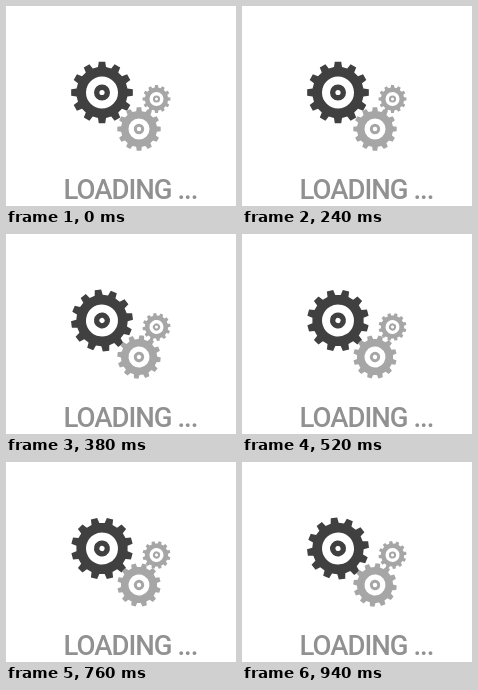
Recreate the animation shown at these times as an HTML page. Size 230x200 px, loop 960 ms.

```html
<!DOCTYPE html>
<html lang="en">
<head>
<meta charset="utf-8">
<title>Loading</title>
<style>
  html, body { margin: 0; width: 100%; height: 100%; overflow: hidden; background: #fff; }
  svg { display: block; width: 230px; height: 200px; }
  text { font: 500 27.5px Roboto, sans-serif; font-stretch: 75%; fill: #919191; }
</style>
</head>
<body>
<svg viewBox="0 0 230 200">
  <g id="gears"></g>
  <text x="57.5" y="193" letter-spacing="-1">LOADING ...</text>
</svg>
<script>
const LOOP = 960, STEP = 20, TEETH = 12, PITCH = 360 / TEETH;
const gears = [
  { x: 96, y: 86.5, r: 31, ring: 16, hub: 8, hole: 2.6, color: '#404040', dir: 1, phase: 0 },
  { x: 133, y: 123, r: 21.8, ring: 10.5, hub: 5.2, hole: 2.2, color: '#a6a6a6', dir: -1, phase: 0 },
  { x: 150.5, y: 93, r: 14, ring: 7, hub: 3.6, hole: 1.5, color: '#a6a6a6', dir: 1, phase: 0 }
];

const at = (r, deg) => {
  const a = (deg - 90) * Math.PI / 180;
  return `${(r * Math.cos(a)).toFixed(2)} ${(r * Math.sin(a)).toFixed(2)}`;
};
const circle = r => `M${r} 0A${r} ${r} 0 1 0 ${-r} 0A${r} ${r} 0 1 0 ${r} 0Z`;

function gearPath({ r, ring, hub, hole }) {
  let d = '';
  const root = r * 0.83;
  for (let i = 0; i < TEETH; i++) {
    const a = i * PITCH;
    d += `${i ? 'L' : 'M'}${at(root, a - 9)}L${at(r, a - 6)}L${at(r, a + 6)}L${at(root, a + 9)}`;
  }
  return d + 'Z' + circle(ring) + circle(hub) + circle(hole);
}

for (const g of gears) {
  g.el = document.createElementNS('http://www.w3.org/2000/svg', 'path');
  g.el.setAttribute('d', gearPath(g));
  g.el.setAttribute('fill', g.color);
  g.el.setAttribute('fill-rule', 'evenodd');
  document.getElementById('gears').append(g.el);
}

function draw(now) {
  const t = Math.floor(now % LOOP / STEP) * STEP / LOOP;
  for (const g of gears) {
    g.el.setAttribute('transform', `translate(${g.x} ${g.y}) rotate(${g.phase + g.dir * 360 * t})`);
  }
  requestAnimationFrame(draw);
}
draw(0);
</script>
</body>
</html>
```
